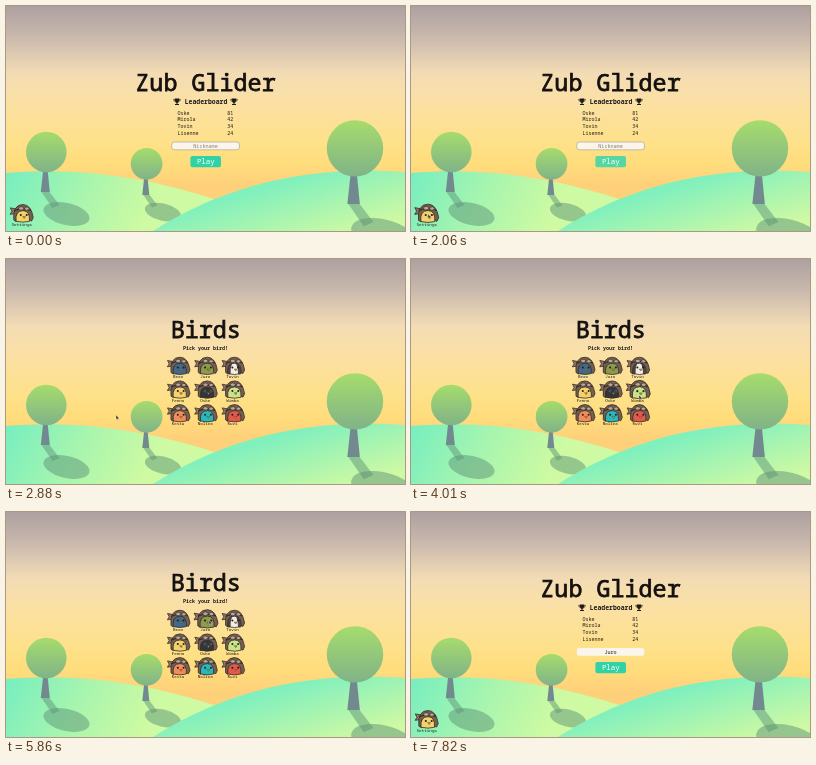
These frames come from a looping animation (399 px wide and 225 px high, 8 s). An HTML page:

```html
<!DOCTYPE html>
<html lang="en">
<head>
<meta charset="utf-8">
<title>Zub Glider</title>
<style>
  html, body { margin: 0; width: 100%; height: 100%; overflow: hidden; background: #fddf88; }
  svg { display: block; width: 100vw; height: 100vh; }
  text { font-family: "Noto Sans Mono", "DejaVu Sans Mono", monospace; fill: #1d1a18; white-space: pre; }
  .title { font-size: 23.4px; font-weight: 500; fill: #141110; stroke: #141110; stroke-width: .75px; }
  .mid { text-anchor: middle; }
</style>
</head>
<body>
<svg viewBox="0 0 399 225" preserveAspectRatio="none">
  <defs>
    <linearGradient id="sky" x2="0" y2="1">
      <stop offset="0" stop-color="#ada0a0"/>
      <stop offset=".12" stop-color="#c5b5ab"/>
      <stop offset=".2" stop-color="#dac7b1"/>
      <stop offset=".3" stop-color="#f3dcb4"/>
      <stop offset=".42" stop-color="#fbe0a5"/>
      <stop offset=".6" stop-color="#fee18a"/>
      <stop offset=".7" stop-color="#ffdd7c"/>
      <stop offset=".8" stop-color="#ffd07a"/>
    </linearGradient>
    <linearGradient id="hillLeft" x2="1" y2=".15">
      <stop offset="0" stop-color="#76eec0"/>
      <stop offset=".4" stop-color="#a8f5ae"/>
      <stop offset=".75" stop-color="#cdfaa2"/>
    </linearGradient>
    <linearGradient id="hillRight" x2="1" y2=".8">
      <stop offset=".4" stop-color="#80f0bd"/>
      <stop offset="1" stop-color="#d0f9a3"/>
    </linearGradient>
    <linearGradient id="crown" x2="0" y2="1">
      <stop offset="0" stop-color="#a6dc6c"/>
      <stop offset="1" stop-color="#80b388"/>
    </linearGradient>
    <!-- origin at the foot of the trunk -->
    <g id="shade" fill="#5f9478" fill-opacity=".5">
      <path d="M-4 0H4L14 13 7 16Z"/>
      <ellipse cx="21" cy="22" rx="23.5" ry="11" transform="rotate(13 21 22)"/>
    </g>
    <g id="tree">
      <path d="M-1.8-25H2L4.5 0H-4.5Z" fill="#728a8f"/>
      <circle cx="1" cy="-40" r="20.3" fill="url(#crown)"/>
    </g>
    <g id="trophy" fill="#1d1a18">
      <path d="M-2-3.3H2V-1Q1.6 1 .5 1.2V2.2H2V3.3H-2V2.2H-.5V1.2Q-1.6 1-2-1Z"/>
      <path d="M-2-2.5H-3.3Q-3.2-.3-1.4 0M2-2.5H3.3Q3.2-.3 1.4 0" fill="none" stroke="#1d1a18" stroke-width=".7"/>
    </g>
  </defs>

  <rect width="399" height="225" fill="url(#sky)"/>
  <path d="M0 167C70 161 140 170 214 195V225H0Z" fill="url(#hillLeft)"/>
  <use href="#shade" transform="translate(39.5 186)"/>
  <use href="#shade" transform="translate(140.5 189) scale(.78)"/>
  <path d="M147 225C200 192 275 158 399 166V225Z" fill="url(#hillRight)"/>
  <use href="#shade" transform="translate(348 198) scale(1.39)"/>
  <use href="#tree" transform="translate(39.3 186)"/>
  <use href="#tree" transform="translate(139.8 189) scale(.78)"/>
  <use href="#tree" transform="translate(347.6 198) scale(1.39)"/>

  <g id="home">
    <text class="title mid" x="199.5" y="84.5">Zub Glider</text>
    <text class="mid" x="200" y="97.8" font-size="6.45" font-weight="700">Leaderboard</text>
    <use href="#trophy" x="171" y="95.8"/>
    <use href="#trophy" x="228" y="95.8"/>
    <g id="scores" font-size="5" font-weight="500"></g>
    <rect id="field" x="165.8" y="136" width="67.6" height="7.8" rx="2.5" fill="#fbf6ec" stroke-width=".6"/>
    <text id="nick" class="mid" x="199.5" y="141.8" font-size="5.1"></text>
    <g id="settings"></g>
    <text class="mid" x="15.8" y="220.3" font-size="4.3" font-weight="500">Settings</text>
  </g>
  <g id="play">
    <rect id="button" x="184.4" y="150" width="30.6" height="11.2" rx="2"/>
    <text class="mid" x="199.8" y="158.3" font-size="7.4" font-weight="500" style="fill:#fff">Play</text>
  </g>
  <g id="picker">
    <text class="title mid" x="199.8" y="79">Birds</text>
    <text class="mid" x="199.5" y="91.3" font-size="5" font-weight="600">Pick your bird!</text>
    <g id="grid"></g>
  </g>
  <path id="cursor" d="M0 0V4.6L1.1 3.6 1.9 5.3 2.6 5 1.9 3.4H3.3Z" fill="#3a3632" stroke="#f4ead8" stroke-width=".35"/>
</svg>
<script>
const LOOP = 8000;
const $ = id => document.getElementById(id);

const scores = [["Oske", 81], ["Mirola", 42], ["Tovin", 34], ["Lisenne", 24]];
const birds = [
  ["Bexo", "#41698a"], ["Juro", "#8b9a4b"], ["Tovin", "#f1eee6"],
  ["Fenno", "#f2d269"], ["Oske", "#30363a"], ["Wimba", "#c9e389"],
  ["Kessu", "#f18c5b"], ["Nolira", "#25b9be"], ["Ruvi", "#e1594b"]
];
const typed = "Juro";

// Keyed tables: [time, value, ...]
const homeFade = [[0, 1], [2440, 1], [2640, 0], [6480, 0], [6690, .55], [6900, 1]];
const playFade = [[0, 1], [2440, 1], [2640, 0], [6480, 0], [6670, 1]];
const pickerFade = [[0, 0], [2620, 0], [2840, 1], [6050, 1], [6330, 0]];
const cursorPath = [
  [1750, 110, 160], [2000, 17, 208], [2450, 17, 208], [2880, 110, 156],
  [3400, 172, 132], [3700, 200, 133], [4010, 228, 136], [4500, 226, 110],
  [5000, 200, 156], [5500, 203, 108], [6200, 203, 108], [6690, 202, 132], [7000, 200, 139]
];

function sample(keys, t) {
  const next = keys.findIndex(k => k[0] > t);
  if (next === 0) return keys[0].slice(1);
  if (next < 0) return keys.at(-1).slice(1);
  const a = keys[next - 1], b = keys[next];
  const u = (t - a[0]) / (b[0] - a[0]);
  const e = u * u * (3 - 2 * u);
  return a.slice(1).map((v, i) => v + (b[i + 1] - v) * e);
}

// A bird in a flying cap, looking right, with the goggle strap loose behind it
function birdArt(color) {
  const ring = color === "#30363a" ? "#8b8f8f" : "none";
  const cheeks = color === "#f1eee6"
    ? '<path d="M-5.8 7.5Q-6.5-1-2-2.6-4 3-3.5 8ZM7.3 7.5Q7.5-1 3-2.6 5 3 5 8Z" fill="#4a4748"/>' : "";
  return `
    <g stroke="#3a2e2a" stroke-width=".8" stroke-linejoin="round">
      <path d="M-6-4.5-11.5-5.5-9.8-2.2-11.6.8-6 0Z" fill="#8d7869"/>
      <path d="M-8 6.5Q-9.5-8.6 1-8.8 9-8.6 11 4L9.4 7.4 6 6V0H-5L-5.6 8Z" fill="#75604f"/>
      <path d="M-5.8 7.6Q-7-2.8 1-2.8 8-2.8 7.4 7.6 1 9.4-5.8 7.6Z" fill="${color}"/>
      ${cheeks}
      <path d="M-8-2.6Q0-6.4 9-3" fill="none" stroke-width="1.3"/>
      <g fill="#b9a797" stroke-width=".6">
        <ellipse cx="-.8" cy="-5" rx="2.5" ry="1.7"/><ellipse cx="4.8" cy="-4.7" rx="2.2" ry="1.6"/>
      </g>
    </g>
    <g fill="#1f1c1a" stroke="${ring}" stroke-width=".5">
      <circle cx="-1.2" cy="1.4" r="1"/><circle cx="4.6" cy="1.4" r="1"/>
    </g>
    <path d="M.6 3H3.4L2.2 5Z" fill="#e49a3e" stroke="#3a2e2a" stroke-width=".4"/>`;
}

$("scores").innerHTML = scores.map(([name, points], i) => {
  const y = 108.7 + i * 6.7;
  return `<text x="171.6" y="${y}">${name}</text><text x="221.3" y="${y}">${points}</text>`;
}).join("");

const spots = birds.map((_, i) => [173 + i % 3 * 27.3, 107 + Math.floor(i / 3) * 23.7]);
$("grid").innerHTML = birds.map(([name, color], i) => {
  const [x, y] = spots[i];
  return `<g class="bird">${birdArt(color)}</g>
    <text class="mid" x="${x - 1}" y="${y + 11.8}" font-size="4.2" font-weight="500">${name}</text>`;
}).join("");
const birdNodes = [...document.querySelectorAll(".bird")];

$("settings").innerHTML = `<g id="first">${birdArt(birds[3][1])}</g><g id="chosen">${birdArt(birds[1][1])}</g>`;

const show = (id, on) => $(id).setAttribute("opacity", Number(on));

function render(t) {
  show("home", sample(homeFade, t)[0]);
  show("play", sample(playFade, t)[0]);
  show("picker", sample(pickerFade, t)[0]);

  const [x, y] = sample(cursorPath, t);
  const cursorOn = t >= 1750 && t < 7000;
  show("cursor", cursorOn);
  $("cursor").setAttribute("transform", `translate(${x} ${y})`);

  birdNodes.forEach((node, i) => {
    const [bx, by] = spots[i];
    const over = cursorOn && Math.abs(x - bx) < 10 && Math.abs(y - by) < 9;
    node.setAttribute("transform", `translate(${bx} ${by}) scale(${over ? 1.06 : 1})`);
  });

  const hover = cursorOn && x < 28 && y > 197;
  $("settings").setAttribute("transform", `translate(16 207.5) scale(${hover ? 1.06 : 1.02})`);
  const picked = t > 5900 && t < 7300;
  show("first", !picked);
  show("chosen", picked);

  const focused = t >= 6950;
  const count = Math.max(0, Math.min(typed.length, Math.floor((t - 7050) / 160)));
  $("field").setAttribute("stroke", focused ? "none" : "#a2998a");
  $("nick").textContent = count ? typed.slice(0, count) : "Nickname";
  $("nick").style.fill = count ? "#1d1a18" : "#85807a";
  $("button").setAttribute("fill", t < 1750 || t >= 7400 ? "#31d3a6" : "#55d6a2");
}

const start = performance.now();
function tick() {
  render((performance.now() - start) % LOOP);
  requestAnimationFrame(tick);
}
tick();
</script>
</body>
</html>
```
